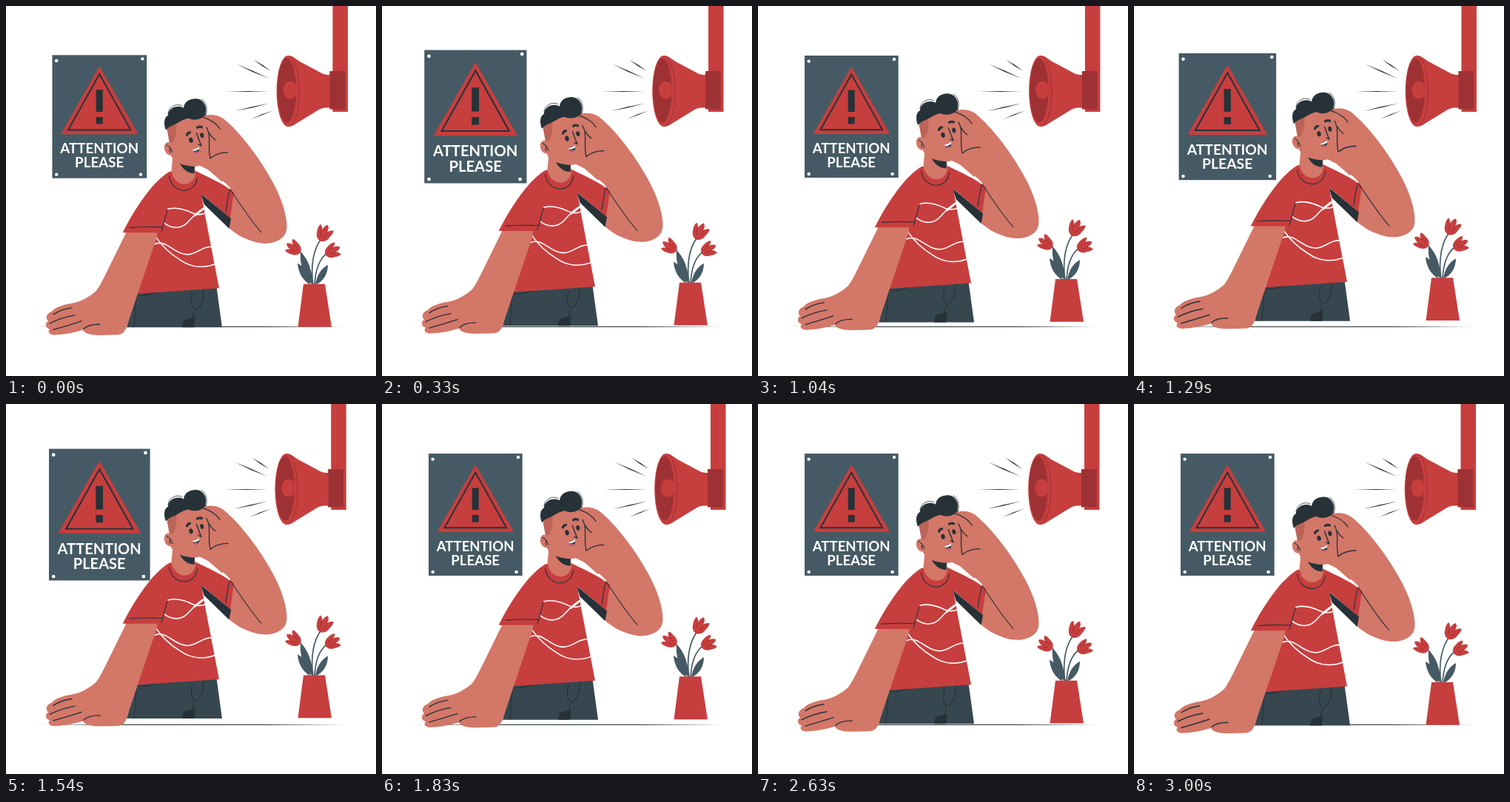
Recreate the animation shown at these times as an HTML page. Size 500x500 px, loop 3.04 s.

```html
<!DOCTYPE html>
<html lang="en">
<head>
<meta charset="utf-8">
<title>Attention please</title>
<style>
  html, body { margin: 0; width: 100%; height: 100%; overflow: hidden; background: #fff; }
  svg { display: block; width: 100%; height: 100%; }
  .red { fill: #c73e3e; }
  .deep { fill: #9e3133; }
  .skin { fill: #d37768; }
  .navy { fill: #263238; }
  .slate { fill: #455a64; }
  .line { fill: none; stroke: #263238; stroke-width: 1.1; stroke-linecap: round; stroke-linejoin: round; }
  .wave { fill: none; stroke: #fff; stroke-width: 1.6; stroke-linecap: round; }
  .stem { fill: none; stroke: #455a64; stroke-width: 1.7; }
  text { font: 700 18.6px Lato, "Open Sans", sans-serif; fill: #fff; text-anchor: middle; }
</style>
</head>
<body>
<svg viewBox="0 0 500 500">
  <defs>
    <g id="tulip">
      <path class="red" d="M0 0C-7-1-9-6-10-11C-11-16-11-20-9-23C-6-21-4-18-4-16C-4-20-2-24 1-26C4-23 5-20 4-16C6-19 9-21 12-21C13-17 11-13 10-10C9-5 6-1 0 0Z"/>
      <path d="M-4-16C-5-12-4-9-2-7M4-16C5-12 4-9 2-7" fill="none" stroke="#9e3133" stroke-width="1"/>
    </g>
    <clipPath id="mouth"><path d="M252 194.500Q257 194 261 190.500Q262 197 258 199Q254 199.500 252 194.500Z"/></clipPath>
    <clipPath id="bell"><ellipse cx="379.500" cy="114" rx="12.500" ry="43.500"/></clipPath>
  </defs>

  <path class="navy" d="M40 433.500L150 433H350L459 433.500L350 434H150Z"/>

  <g id="poster">
    <rect class="slate" x="63" y="67" width="126.700" height="165"/>
    <g fill="#fff">
      <circle cx="68.700" cy="74.600" r="2.200"/><circle cx="184" cy="72" r="2.200"/>
      <circle cx="68.700" cy="227" r="2.200"/><circle cx="181.600" cy="227" r="2.200"/>
    </g>
    <path class="red" d="M126.300 82L178.300 173H74.500Z"/>
    <path d="M126.300 92.500L168.200 167.300H84.400Z" fill="none" stroke="#263238" stroke-width="1.900"/>
    <path class="navy" d="M121.700 113.500h9v29.500h-9zM121.700 150h9v9.500h-9z"/>
    <text x="126.200" y="198.700">ATTENTION</text>
    <text x="126.200" y="217.500">PLEASE</text>
  </g>

  <g id="horn">
    <rect class="red" x="441.500" y="0" width="20.500" height="143"/>
    <path class="red" d="M381 67C388 67 392 72 397 75L427 91Q431 93 438 93V137.500H431Q427 137.500 423 140L392 159Q387 163 381 163Z"/>
    <rect class="deep" x="437.500" y="88" width="20.800" height="51.500"/>
    <ellipse class="red" cx="381" cy="115" rx="15.300" ry="48"/>
    <path d="M384 68C400 78 401 152 384 162" fill="none" stroke="#9e3133" stroke-width="1"/>
    <ellipse class="deep" cx="379.500" cy="114" rx="12.500" ry="43.500"/>
    <ellipse class="red" cx="384" cy="113.500" rx="9.500" ry="12" clip-path="url(#bell)"/>
    <path class="navy" d="M334.500 72.500L347 79.800L358 88L346 81ZM311.500 78.500L334 87.700L355.500 98L333 88.900ZM298 115.500L327 114.900L355.500 115.500L327 116.100ZM309.500 142L332 136.300L356 131.500L333 137.500ZM331 153L346 146.300L360.500 141.500L346 147.500Z"/>
  </g>

  <g id="vase">
    <path class="stem" d="M414 378C413 358 407 342 396 331M415 378C411 350 416 328 426 315M417 378C418 352 426 340 434 334"/>
    <path class="slate" d="M413 376C400 362 397 347 398 333C409 343 414 358 413 376ZM411 377C400 370 395 360 394 348C404 353 411 363 411 377ZM418 377C420 364 426 355 435 350C435 362 429 373 418 377Z"/>
    <use href="#tulip" transform="translate(398 333) rotate(-60) scale(.86)"/>
    <use href="#tulip" transform="translate(425 318) rotate(22) scale(.93)"/>
    <use href="#tulip" transform="translate(432 337) rotate(57) scale(.86)"/>
    <path class="red" d="M402 376H431L440 433.800H394.500Z"/>
  </g>

  <g id="person">
    <path d="M177 384L163 434.500H292L284 376Z" fill="#37474f"/>
    <path class="navy" d="M238 434.500L240 425L255 421L267 412L256 420L254 434.500Z"/>
    <path class="line" d="M178 391Q192 392 203 387M176 392L173 434M252 387C249 402 251 411 257 410C265 406 267 394 267 384M255 411L252 422"/>

    <path class="skin" d="M264 151C274 144 289 147 298 156C322 177 349 215 364 245C378 273 383 300 377 309C370 320 353 323 340 320C324 316 312 310 300 299L303 246C294 236 284 231 274 222L262 216Z"/>
    <path class="red" d="M221 224L254 222C275 232 292 240 301 247L308 252L303 287L264 254L270 288L288 381.500L177 389L203 306H158C180 264 200 237 221 224Z"/>
    <path class="navy" d="M263.500 254L304 287.500L301.500 301L267.500 268Z"/>
    <path class="line" d="M302 249Q299 262 297 278M303 248C317 269 330 289 345 306"/>

    <path class="wave" d="M219 274.500C232 271 244 276 252 280Q261 284 270 280M213 293C226 303 239 301 248 290C255 282 262 276 269 272"/>
    <path class="wave" d="M201 322C217 315 227 336 246 336C260 335 264 324 283 325.500M203 313C212 326 222 335 235 343C250 354 268 355 285 348"/>
    <path d="M255 283.500Q262 278 269 272.500" class="wave" style="stroke-width:2.300"/>

    <path class="skin" d="M226 196L223.500 223C227 246 254 247 256 226L254 212Z"/>
    <path class="navy" d="M232 206Q240 216 255 216L254.500 226.500C244 226 236 219 232 206Z"/>
    <path class="line" d="M220.500 230C224 255 256 256 258.500 232"/>

    <path class="skin" d="M219 160L223 203C228 212 242 217 255 217C268 217 276 207 277 198L270 145L240 148Z"/>
    <path d="M217 164L221 186L226 184Q232 174 230 158Z" fill="#bd6459"/>
    <ellipse class="skin" cx="220.500" cy="193" rx="6.500" ry="9" transform="rotate(-18 220.500 193)"/>
    <path class="line" d="M217 188Q222 190 225 198M222 193Q220 195 222 198"/>
    <path class="navy" d="M216 168C213 160 213 151 219 148C219 138 232 133 240 138C241 129 249 125 258 125.500C269 127 273 140 268.500 148C262 155 253 155 247 152C238 153 231 160 224 162Q219 164 216 168Z"/>
    <path class="line" style="stroke-width:.8" d="M219 146C219 136 231 131 238 135M264 126C272 130 273 143 269 150"/>

    <path class="line" style="stroke-width:3.200" d="M244.500 174.500Q245.500 171.500 248.500 171M258.500 164.500Q261 162.500 264.500 164"/>
    <ellipse class="navy" cx="250" cy="181.500" rx="2.700" ry="3.600" transform="rotate(-12 250 181.500)"/>
    <ellipse class="navy" cx="264.800" cy="175" rx="2.500" ry="3.500" transform="rotate(-12 264.800 175)"/>
    <path class="line" style="stroke-width:1.400" d="M257.500 172Q260 180 264 189L260 187"/>
    <g clip-path="url(#mouth)">
      <rect class="navy" x="250" y="189" width="14" height="14"/>
      <path d="M251 193L262 189V193Q257 196.500 252 196.500Z" fill="#fff"/>
      <ellipse cx="257" cy="199" rx="3.500" ry="2.500" fill="#c05b83"/>
    </g>

    <path class="skin" d="M265 151C278 145 290 149 298 157L308 200L292 238L274 222C275 214 273 208 277 205L274 186Q272 171 265 151Z"/>
    <path class="line" style="stroke-width:1.300" d="M265 150C275 153 284 158 289 166M271 164C278 177 272 188 276 206C283 200 290 198 300 198M275 172Q278 178 283 181"/>

    <path class="skin" d="M163 305L135 362C128 376 124 383 121 386C113 393 101 400 89 402C77 404 65 408 62 413C54 416 53 422 57 426C52 429 53 435 59 437C55 441 60 446 68 444.500C81 444 94 441 104 438C106 443 115 445.500 130 445L152 444.500Q160 443.500 163 434L178 389L204 312V305Z"/>
    <path class="red" d="M158 306.300C168 286 177 271 188 259L218 276L210 306.300Z"/>
    <path class="line" d="M167 299.500Q190 298 211 299M218 276L210 305"/>
    <path class="line" style="stroke-width:1.400" d="M64 417Q74 410 89 408M59 429Q75 421 93 418M64 437.500Q82 432.500 102 426M105 436.500Q112 430 127 430.500"/>
  </g>
</svg>
<script>
  const LOOP = 3040, CYCLE = 3000, LEAD = 25;
  const beat = [[0, 1], [.1, 1.1], [.3, 1], [.4, 1], [.5, 1.1], [.6, 1], [1, 1]];
  const shake = [[0, 0], [.1, -1], [.2, 2], [.3, -4], [.4, 4], [.5, -4], [.6, 4], [.7, -4], [.8, 2], [.9, -1], [1, 0]];
  const float = [[0, 0], [.5, -10], [1, 0]];
  const part = id => document.getElementById(id);
  const poster = part('poster'), horn = part('horn'), vase = part('vase'), person = part('person');

  // Linear interpolation between [position, value] keys
  function at(keys, p) {
    const i = Math.max(1, keys.findIndex(k => k[0] >= p));
    const [p0, v0] = keys[i - 1], [p1, v1] = keys[i];
    return v0 + (v1 - v0) * (p - p0) / (p1 - p0);
  }

  function draw(ms) {
    const p = Math.min(ms % LOOP + LEAD, CYCLE) / CYCLE;
    const rise = `translate(0 ${at(float, p)})`;
    poster.setAttribute('transform', `translate(126.3 149.4) scale(${at(beat, p)}) translate(-126.3 -149.4)`);
    horn.setAttribute('transform', `translate(${at(shake, p)} 0)`);
    vase.setAttribute('transform', rise);
    person.setAttribute('transform', rise);
  }

  let start;
  function tick(now) {
    start ??= now;
    draw(now - start);
    requestAnimationFrame(tick);
  }
  draw(0);
  requestAnimationFrame(tick);
</script>
</body>
</html>
```
